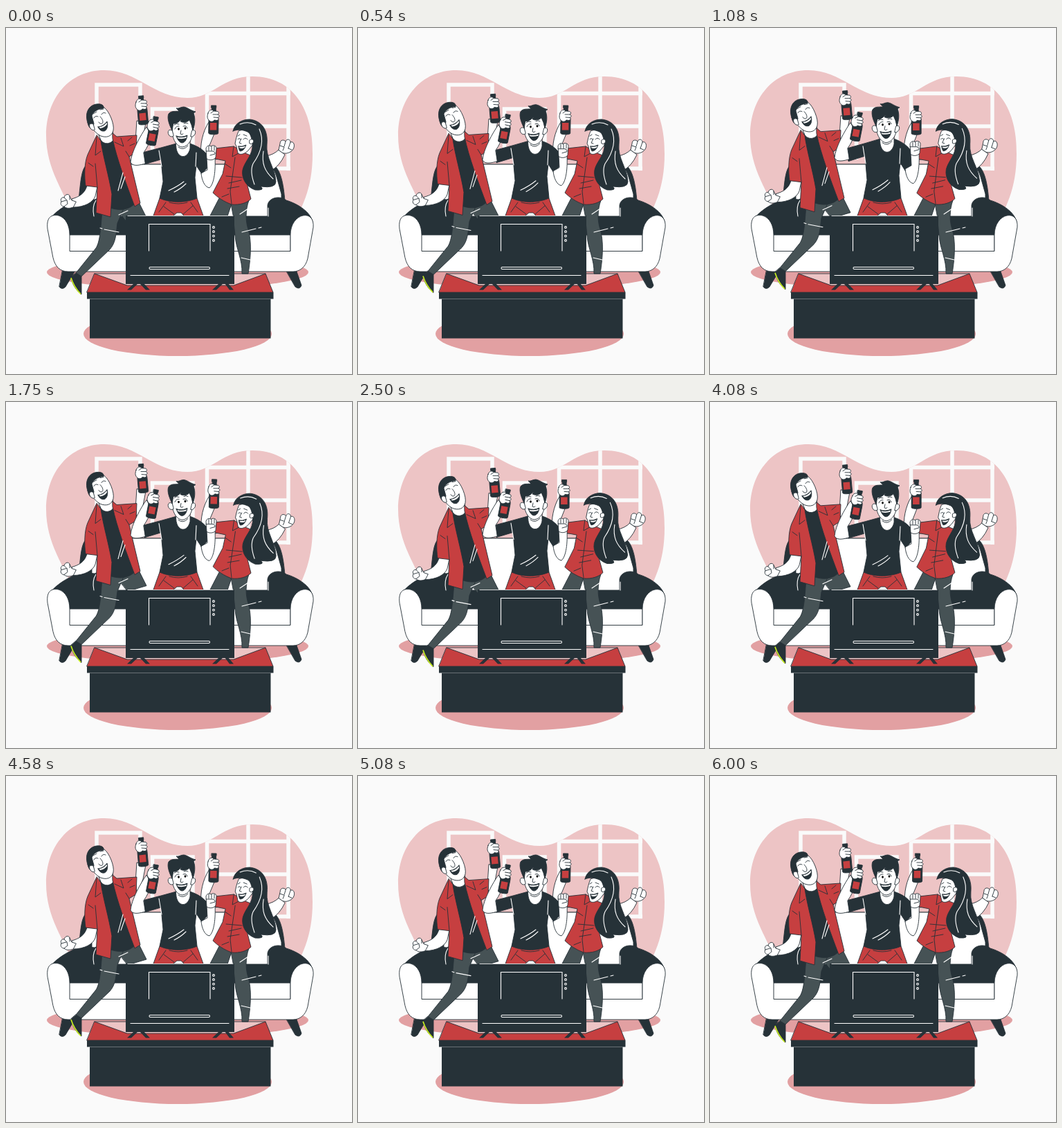
Animation of 500x500 px, one loop 6040 ms. Source, as an HTML page:

```html
<!DOCTYPE html>
<html lang="en">
<head>
<meta charset="utf-8">
<title>Friends cheering</title>
<style>
html, body { margin: 0; width: 100%; height: 100%; overflow: hidden; background: #fafafa; }
svg { display: block; width: 100vw; height: 100vh; }
.w, .d, .r, .g { stroke: #263238; stroke-width: .9; stroke-linejoin: round; stroke-linecap: round; }
.w { fill: #fff; }
.d { fill: #263238; }
.r { fill: #c63f40; }
.g { fill: #465255; }
.l { fill: none; stroke: #263238; stroke-width: .9; stroke-linecap: round; stroke-linejoin: round; }
.b { stroke-width: 1.5; }
.h { fill: none; stroke: #fff; stroke-width: 1.1; stroke-linecap: round; }
.flat { fill: #263238; }
.frame { fill: none; stroke: #fafafa; stroke-width: 5.5; }
</style>
</head>
<body>
<svg viewBox="0 0 500 500">
<defs>
  <path id="blob" d="M58 155C58 102 91 61 142 61C190 61 214 101 262 101C300 101 312 70 356 70C416 70 444 119 443 182C443 232 428 262 405 300C380 345 330 374 248 374C160 374 120 340 98 275C84 235 58 205 58 155Z"/>
  <clipPath id="wall"><use href="#blob"/></clipPath>
  <g id="bottle">
    <path class="d" d="M-3.4 -21H3.4V-17.500H2.900L3.200 -9C6.400 -5 7 -3 7 0V19C7 21.500 -7 21.500 -7 19V0C-7 -3 -6.400 -5 -3.200 -9L-2.900 -17.500H-3.400Z"/>
    <path fill="#c63f40" d="M-5 4H4.500V14.500H-5Z"/>
  </g>
  <g id="grip">
    <path class="w" d="M-7 -5C-6 -10 -1 -11 1 -8L7 -7.500C9 -6 9 -4 7 -3C10 -2 9.500 1 7 1.500C9 3 8 5.500 5 5.500L2 5C0 8 -4 8 -6 5C-9 2 -8 -2 -7 -5Z"/>
    <path class="l" d="M0 -3L7 -3M1 1L7 1.500M1 -8L-3 -5"/>
  </g>
</defs>

<rect width="500" height="500" fill="#fafafa"/>
<use href="#blob" fill="#edc4c5"/>
<g clip-path="url(#wall)">
  <path class="frame" d="M131 180V82H194V180M211.500 190V117H270V190"/>
  <path class="frame" d="M290.500 203V60M350 203V60M408 206V60M288 94.500H411M290 142H408M288 203H411"/>
</g>
<ellipse cx="248" cy="353" rx="189" ry="24" fill="#e2a0a2"/>
<path fill="#edc4c5" d="M128 355H375L329 372H175Z"/>
<ellipse cx="248" cy="442" rx="136" ry="32" fill="#e2a0a2"/>

<!-- sofa -->
<path class="d" d="M82 349H101L86 374Q81 379 77 374ZM404 349H419L427 372Q424 379 418 374Z"/>
<path class="d" d="M105 248C108 225 108 202 118 197H385C397 203 401 225 403 250L390 275H112Z"/>
<path class="w" d="M124 275V212Q124 197 140 197H372Q387 199 391 215L398 240V275Z"/>
<path class="d" d="M62 278C72 262 100 248 112 246L128 248C135 244 150 247 152 256V272H378V256C380 244 397 242 405 249C422 254 440 266 443 280L412 302H92Z"/>
<path class="w" d="M92 299H411V323H92Z"/>
<path class="w" d="M60 290C58 273 66 269 76 271C86 274 92 285 92 299V322.500H411V299C411 283 420 273 429 271C439 269 445 276 444 288L436 333C433 346 424 352 415 352H90C78 352 71 345 68 332Z"/>
<path class="h" stroke-width=".8" d="M127 272Q124 258 130 249M379 272V260"/>

<!-- woman -->
<path class="g" d="M308 246L293 275H319L326 254Z"/>
<path class="g" d="M325 252L351 249C346 263 346 279 350 291C355 308 354 330 350 355H341C342 335 332 318 331 300L328 270Z"/>
<path class="h" d="M338 269L350 261M340 332L353 335M341 295L361 290M365 289L369 288"/>
<g id="woman">
  <path class="w" d="M309 174L291 177L305 143L293 136C284 150 280 170 282 183C284 193 297 191 309 189Z"/>
  <use href="#bottle" transform="translate(300 133) rotate(1)"/>
  <use href="#grip" transform="translate(299 128)"/>
  <path class="w" d="M376 185Q387 183 394 176L403 183Q395 200 383 206L376 200Z"/>
  <path class="w" d="M394 176L396 167C396 161 402 161 404 164C406 159 411 161 411 165C416 163 418 170 415 175C412 180 404 183 399 180Z"/>
  <path class="l" d="M404 164L402 171M411 165L408 174M396 170L402 172L400 177M408 174L413 176"/>
  <path class="r" d="M302 174L329 171L346 181L368 190L360 220L348 224L354 247C348 253 338 256 326 255C315 251 306 245 299 238L313 211L317 192L302 189Z"/>
  <path class="w" d="M336 149C333 156 332 162 331 167L333 171L335 181C339 184 345 182 350 177L361 163L352 145Z"/>
  <path class="d" d="M328 149C330 138 341 132 352 132C370 134 379 148 377 168C375 188 389 202 390 222Q390 232 368 229Q375 235 360 234C346 229 340 216 342 205C345 192 357 184 356 168C355 158 353 152 349 150C342 147 335 146 328 149Z"/>
  <path class="w" d="M352 162C356 159 359 162 357 166Q354 169 352 167Z"/>
  <path class="h" d="M338 139Q350 134 361 140M366 146C374 164 367 182 357 196Q352 207 359 226M372 178C369 196 374 207 386 218"/>
  <path class="l" d="M335 161Q337 158 339 161M343 161Q346 157 349 161M335 156L338 154M343 154L348 156M340 160L337 166L340 167"/>
  <path class="d" d="M336 171Q341 172 347 169Q344 178 338 178Q336 175 336 171Z"/>
  <path fill="#fff" d="M337 171.800Q342 172.500 346 170.500L344.500 173Q341 174.500 337.500 173.500Z"/>
  <path class="l" d="M329 171L327 186L336 181M331 187L324 236L326 254M318 214L341 216M322 224L340 220M320 232L337 229M322 240L312 244M316 196L325 202"/>
</g>

<!-- left man -->
<g id="left">
  <path class="g" d="M160 262L191 250L203 274L176 282Z"/>
  <path class="g" d="M139 262L172 256L161 282C159 297 159 310 150 320L109 359L101 354L130 318C136 309 137 288 139 262Z"/>
  <path class="h" d="M163 270L176 264M142 291L163 295M136 289L139 290"/>
  <path class="d" d="M101 354L109 359V385C101 379 95 369 94 360Z"/>
  <path fill="none" stroke="#c6ee1e" stroke-width="1.700" d="M94 361Q98 374 108 384.500"/>
  <path class="w" d="M187 164L189 134L202 137L198 158L190 179Z"/>
  <use href="#bottle" transform="translate(197 119) rotate(-5)"/>
  <use href="#grip" transform="translate(195 112)"/>
  <path class="w" d="M117 228C114 239 106 244 95 247L97 259C113 259 126 252 129 243L132 229Z"/>
  <path class="w" d="M97 259C92 261 87 261 84 258C80 258 78 254 80 251C78 247 81 244 84 245C85 240 91 239 92 243L95 249L101 251Z"/>
  <path class="l" d="M80 251L87 249M84 245L88 249M84 258L89 254L88 249M92 243V248"/>
  <path class="d" d="M136 160L155 158L188 252C177 264 164 264 151 260L137 210Z"/>
  <path class="w" d="M132 149L137 162C143 170 153 167 156 160L154 148Z"/>
  <path class="r" d="M131 155L118 183C113 195 113 215 115 228L132 230L130 267L151 273L153 240C149 215 140 185 137 163Z"/>
  <path class="r" d="M154 152L160 157L189 155L188 180L178 186L194 253L186 258C174 226 160 189 154 160Z"/>
  <path class="l" d="M132 230L129 196M131 157L129 184L137 178M157 165L170 171L166 159M176 163L182 158M119 195L126 200M178 186L173 178M186 167L179 170"/>
  <path class="h" d="M169 209L162 235M172 215L166 232"/>
  <path class="w" d="M122 128C121 116 133 110 142 115C149 120 157 139 155 148C153 157 145 159 137 156C129 152 124 145 122 138Z"/>
  <path class="d" d="M118 137C113 121 121 111 131 110C138 109 142 112 141 116C132 117 126 121 124 127L127 138L125 147C121 145 119 142 118 137Z"/>
  <path class="w" d="M126 139C121 136 119 141 122 145Q125 149 128 147Z"/>
  <path class="l" d="M127 130Q129 126 133 128M138 125Q140 121 144 123M126 124L131 121M136 118L141 117M136 128C140 132 141 136 139 138C137 139 135 138 134 136"/>
  <path class="d" d="M133 143Q141 142 146 135C148 141 146 148 142 149Q136 150 133 143Z"/>
  <path fill="#fff" d="M134.500 143.300Q142 142 145.500 136.500L146 139Q143 144 136 145Z"/>
</g>

<!-- middle man -->
<path class="r" d="M222 246L212 274H286L276 246Z"/>
<path class="l" d="M231 252L221 266M267 252L277 266M228 258L243 269M270 257L256 269M236 252Q249 256 262 252"/>
<path class="w" d="M242 271L247 267H253L257 271Z"/>
<g id="torso">
  <path class="d" d="M246 167L224 173L197 180L200 197L224 190L227 222L222 246C240 254 262 252 276 246L273 216L275 199L283 211L297 195C292 182 284 173 266 167Z"/>
  <path class="h" d="M221 177Q223 189 225 200M275 180L274 200M235 235Q248 229 257 222M243 237Q253 232 260 225"/>
</g>
<g id="middle">
  <path class="w" d="M199 180C204 173 208 165 210 156L203 143C195 154 181 179 180 194C183 201 194 198 201 196Z"/>
  <use href="#bottle" transform="translate(213 149) rotate(11)"/>
  <use href="#grip" transform="translate(212 142) rotate(9)"/>
  <path class="w" d="M282 210L291 205L290 187L302 187C303 205 301 225 294 231C287 230 283 220 282 210Z"/>
  <path class="w" d="M290 189L289 174C290 170 294 169 296 171C300 168 305 171 304 175L303 187C301 191 294 192 290 189Z"/>
  <path class="l" d="M289 178H299Q303 179 302 182L295 184M293 171V177M297 171V177M301 171V177"/>
  <path class="w" d="M245 163L246 174C249 190 263 189 266 174V163Z"/>
  <path class="l" d="M249 172Q256 178 263 170"/>
  <path class="w" d="M240 132V150C241 163 248 172 255 172C264 171 270 160 270 148L269 131Z"/>
  <path class="w" d="M240 148C235 145 233 150 235 154Q238 159 242 156ZM269 148C274 145 275 152 272 155Q270 158 267 157Z"/>
  <path class="d" d="M240 148C237 142 232 131 235 124C239 119 245 121 250 120L246 116C250 117 252 114 257 114C263 115 266 119 274 121L271 123C274 131 273 140 270 148L268 140L265 133C261 137 256 137 252 135L254 131C250 136 246 139 242 138Z"/>
  <g><ellipse cx="249.500" cy="146" rx="1.400" ry="1.800"/><ellipse cx="259" cy="145" rx="1.400" ry="1.800"/></g>
  <path class="l" d="M244 146Q246 141 250 142M256 142Q261 140 262 145M243 140Q246 137 250 139M257 138Q260 136 263 138M253 148L252 153Q254 155 256 153"/>
  <path class="d" d="M246 156Q254 159 262 155C261 162 258 166 254 166Q249 165 246 156Z"/>
  <path fill="#fff" d="M247.500 157.500Q254 159.500 261 156.800L260.300 159Q254 161 248.300 159.500Z"/>
</g>

<!-- table and screen -->
<path class="r" d="M128 355L175 372H329L375 355L386 382H117Z"/>
<path class="l" d="M128 355H375"/>
<path class="flat" d="M117 382H386.500V391.500H117ZM121 391H382.500V448.500H121Z"/>
<path class="h" stroke-width=".5" opacity=".3" d="M121 391.500H382"/>
<path class="flat" d="M185 369H191L181 378.500H175ZM193 369H199L208 378.500H202ZM308 369H314L304 378.500H298ZM316 369H321L329 378.500H323Z"/>
<path class="flat" d="M173 271H330V370H173Z"/>
<path class="h" d="M176 271.500H328" opacity=".8"/>
<path class="h" d="M206.500 322V283.500H295V322M180 357.500H322"/>
<rect class="h" x="207" y="345.500" width="87.500" height="3" rx="1.500"/>
<g class="h"><circle cx="300" cy="288" r="1.400"/><circle cx="300" cy="294.300" r="1.400"/><circle cx="300" cy="300.600" r="1.400"/><circle cx="300" cy="307" r="1.400"/></g>
</svg>
<script>
const LOOP = 6040;
const TAU = Math.PI * 2;
const part = id => document.getElementById(id);
const [left, middle, torso, woman] = ["left", "middle", "torso", "woman"].map(part);
const move = (el, value) => el.setAttribute("transform", value);
const wave = x => (1 - Math.cos(TAU * x)) / 2;

function draw(t) {
  move(left, `translate(0 ${-9 * wave(t / 3020)})`);

  // Two hops, then a rest
  const hop = t < 4200 ? 6.3 * wave(t / 2100) : 0;
  move(middle, `translate(0 ${-hop})`);
  move(torso, `translate(0 250) scale(1 ${1 + hop / 76}) translate(0 -250)`);

  const sway = 1.3 * (0.3 - wave(t / 1510 - 0.18));
  move(woman, `rotate(${sway} 325 250)`);
}

const start = performance.now();
function tick() {
  draw((performance.now() - start) % LOOP);
  requestAnimationFrame(tick);
}
tick();
</script>
</body>
</html>
```
